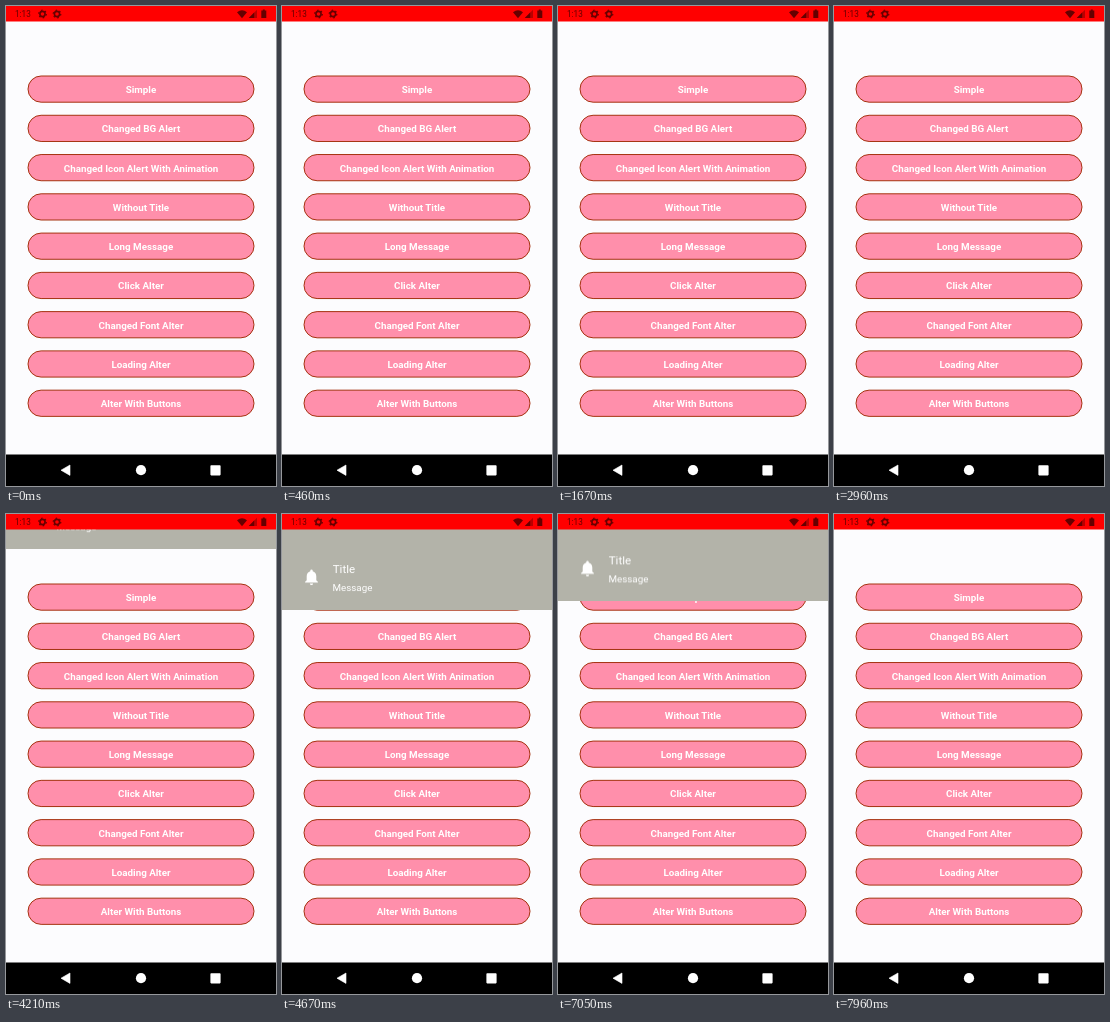
Animation of 270 by 480 pixels, one loop 8 s. Source, as an HTML page:

```html
<!DOCTYPE html>
<html lang="en">
<head>
<meta charset="utf-8">
<title>Alert demo</title>
<style>
  html, body { margin: 0; width: 100%; height: 100%; overflow: hidden; background: #fcfcfe; }
  svg { display: block; width: 100vw; height: 100vh; }
  text { font-family: Roboto, "Noto Sans", sans-serif; }
  .button rect { fill: #ff8fab; stroke: #a5320f; stroke-width: 1; }
  .button text { fill: #fff; font-size: 9.8px; font-weight: 700; text-anchor: middle; }
  .alert { animation: slide 8s infinite; }
  .alert text { fill: #fff; }
  @keyframes slide {
    0% { transform: translateY(-99px); }
    51.225% { transform: translateY(-99px); animation-timing-function: cubic-bezier(.333, 1, .667, 1); }
    61.6% { transform: translateY(0); }
    82.75% { transform: translateY(0); animation-timing-function: cubic-bezier(.333, 0, .667, 0); }
    93.75%, 100% { transform: translateY(-99px); }
  }
</style>
</head>
<body>
<svg viewBox="0 0 270 480" preserveAspectRatio="none">
  <defs>
    <g id="gear" fill="none" stroke="#660000">
      <circle r="2.6" stroke-width="1.6"/>
      <circle r="3.8" stroke-width="1.2" stroke-dasharray="1.6 2.38"/>
    </g>
  </defs>
  <rect width="270" height="480" fill="#fcfcfe"/>
  <g id="list"></g>

  <g class="alert">
    <rect y="-10" width="270" height="109" fill="#b3b3a9"/>
    <path transform="translate(19.9 56.4) scale(.8)" fill="#fff"
      d="M12 22c1.1 0 2-.9 2-2h-4c0 1.1.9 2 2 2zm6-6v-5c0-3.07-1.64-5.64-4.5-6.32V4a1.5 1.5 0 0 0-3 0v.68C7.63 5.36 6 7.92 6 11v5l-2 2v1h16v-1z"/>
    <text x="50.7" y="62.2" font-size="11.6">Title</text>
    <text x="50.5" y="80.3" font-size="9.8">Message</text>
  </g>

  <rect width="270" height="15.5" fill="#f00"/>
  <text x="9" y="11" font-size="8.2" fill="#660000">1:13</text>
  <use href="#gear" x="36.5" y="8"/>
  <use href="#gear" x="51" y="8"/>
  <g fill="#660000">
    <path d="M231 6.2Q236 2.2 241 6.2L236 12.2Z"/>
    <path d="M251 3.8V12H242.8Z" opacity=".45"/>
    <path d="M248.2 6.6V12H242.8Z"/>
    <path d="M256.8 3.6h2v.9h1.5V12h-5V4.5h1.5z"/>
  </g>

  <rect y="448.5" width="270" height="31.5"/>
  <g fill="#fff">
    <path d="M55 464.2L64 459V469.4Z" stroke="#fff" stroke-width=".6" stroke-linejoin="round"/>
    <circle cx="135" cy="464.2" r="5.1"/>
    <rect x="204.4" y="459.2" width="10.2" height="10.2" rx=".8"/>
  </g>
</svg>
<script>
  const labels = ['Simple', 'Changed BG Alert', 'Changed Icon Alert With Animation',
    'Without Title', 'Long Message', 'Click Alter', 'Changed Font Alter',
    'Loading Alter', 'Alter With Buttons'];
  document.getElementById('list').innerHTML = labels.map((label, i) =>
    `<g class="button" transform="translate(0 ${(i * 39.27).toFixed(2)})">
      <rect x="22" y="70" width="226" height="26.2" rx="13.1"/>
      <text x="135" y="87">${label}</text>
    </g>`).join('');
</script>
</body>
</html>
```
